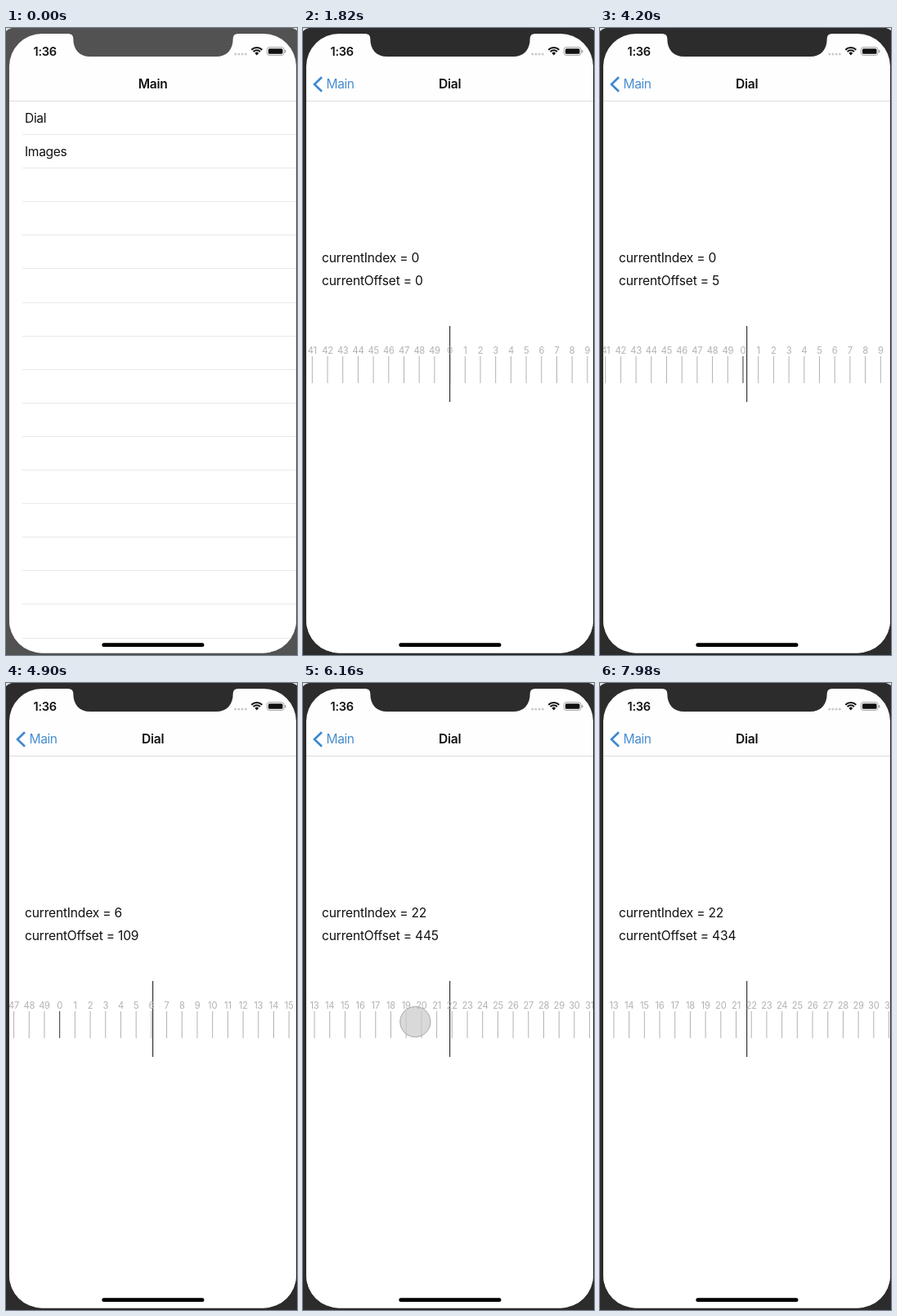
An HTML page with a canvas that plays this animation: 356x768 px, repeating every 8 s.

```html
<!DOCTYPE html>
<html lang="en">
<head>
<meta charset="utf-8">
<title>Dial</title>
<style>
  html, body { margin: 0; width: 100%; height: 100%; overflow: hidden; background: #fff; }
  canvas { display: block; width: 356px; height: 768px; }
</style>
</head>
<body>
<canvas id="stage"></canvas>
<script>
const W = 356, H = 768, LOOP = 8000, STEP = 70;
const LEFT = 4, RIGHT = 355, TOP = 7, BOTTOM = 765.4, MID = 179.6, NAV_BOTTOM = 89.5;
const SCALE = 0.935, TICK = 20, COUNT = 50;
const FONT = 'Inter, Roboto, "Liberation Sans", sans-serif';

const canvas = document.getElementById('stage');
const ratio = window.devicePixelRatio || 1;
canvas.width = W * ratio;
canvas.height = H * ratio;
const ctx = canvas.getContext('2d');

const drag = u => u ** 1.4;
const glide = k => u => (1 - Math.exp(-k * u)) / (1 - Math.exp(-k));

// Offset movements; those with a finger position are drags.
const moves = [
  { start: 2520, end: 2870, from: 0, to: 205, ease: drag, finger: [250, 420, 0] },
  { start: 2870, end: 3430, from: 205, to: 223, ease: glide(8) },
  { start: 3430, end: 3780, from: 223, to: 60, ease: drag, finger: [110, 422, 5] },
  { start: 3780, end: 4480, from: 60, to: 4.5, ease: glide(8) },
  { start: 4480, end: 4760, from: 4.5, to: 90, ease: drag, finger: [260, 415, 0] },
  { start: 4760, end: 5110, from: 90, to: 140, ease: glide(2) },
  { start: 5110, end: 5390, from: 140, to: 312, ease: drag, finger: [270, 415, 0] },
  { start: 5390, end: 6090, from: 312, to: 445, ease: glide(1.4) },
  { start: 6090, end: 6370, from: 445, to: 390, ease: drag, finger: [130, 415, 0] },
  { start: 6370, end: 6580, from: 390, to: 375, ease: glide(2) },
  { start: 6930, end: 7350, from: 375, to: 412, ease: drag, finger: [153, 420.5, 8] },
  { start: 7350, end: 8050, from: 412, to: 434.2, ease: glide(4) }
];

function dialState(t) {
  const move = moves.filter(m => t >= m.start).pop();
  if (!move) return { offset: 0 };
  const u = Math.min(1, (t - move.start) / (move.end - move.start));
  const offset = move.from + (move.to - move.from) * move.ease(u);
  if (!move.finger || u >= 1) return { offset };
  const [x, y, drift] = move.finger;
  return { offset, finger: [x - (offset - move.from) * SCALE, y + drift * u] };
}

function text(str, x, y, { size = 15.6, weight = 400, color = '#111', align = 'left', spacing = -0.33 } = {}) {
  ctx.font = `${weight} ${size}px ${FONT}`;
  ctx.letterSpacing = spacing + 'px';
  ctx.textAlign = align;
  ctx.fillStyle = color;
  ctx.fillText(str, x, y);
}

function rect(x, y, w, h, color) {
  ctx.fillStyle = color;
  ctx.fillRect(x, y, w, h);
}

function pill(x, y, w, h, r, color) {
  ctx.fillStyle = color;
  ctx.beginPath();
  ctx.roundRect(x, y, w, h, r);
  ctx.fill();
}

function line(x1, y1, x2, y2, color, width = 1) {
  ctx.strokeStyle = color;
  ctx.lineWidth = width;
  ctx.beginPath();
  ctx.moveTo(x1, y1);
  ctx.lineTo(x2, y2);
  ctx.stroke();
}

function touch(x, y) {
  ctx.beginPath();
  ctx.arc(x, y, 18.6, 0, 7);
  ctx.fillStyle = 'rgba(205, 205, 205, .75)';
  ctx.fill();
  ctx.strokeStyle = '#a6a6a6';
  ctx.lineWidth = 1;
  ctx.stroke();
}

function drawList(pressed) {
  rect(LEFT, NAV_BOTTOM, W, H, '#fff');
  if (pressed) rect(LEFT, NAV_BOTTOM, W, 41, '#d9d9d9');
  for (let i = 1; i <= 16; i++) {
    const y = Math.floor(89.4 + 41.1 * i) + 0.5;
    line(20, y, W, y, '#e9e9e9');
  }
  text('Dial', 23, 115.6);
  text('Images', 23, 156.7);
}

// The offset label trails the scale by one step.
function drawDial(t) {
  const { offset, finger } = dialState(t);
  const index = Math.round(offset / TICK);
  rect(LEFT, NAV_BOTTOM, W, H, '#fff');
  text(`currentIndex = ${index % COUNT}`, 23, 286.5, { spacing: -0.2 });
  text(`currentOffset = ${Math.round(dialState(t - STEP).offset)}`, 23, 314.6, { spacing: -0.2 });
  line(MID, 365, MID, 458, '#333', 1.2);
  for (let i = index - 10; i <= index + 10; i++) {
    const x = MID + (i * TICK - offset) * SCALE;
    const value = (i + COUNT) % COUNT;
    text(value, x, 399, { size: 11.2, color: '#b2b2b2', align: 'center', spacing: -0.25 });
    line(x, 402, x, 435, value ? '#b2b2b2' : '#333');
  }
  if (finger) touch(...finger);
}

function drawNav(p) {
  rect(LEFT, 45, W, NAV_BOTTOM - 45, '#fefefe');
  line(LEFT, NAV_BOTTOM, W, NAV_BOTTOM, '#dcdcdc');
  const title = { weight: 600, align: 'center' };
  ctx.globalAlpha = 1 - p;
  text('Main', MID - 134 * p, 74.4, title);
  ctx.globalAlpha = p;
  text('Dial', MID + 150 * (1 - p), 74.4, title);
  text('Main', 28.6 + 134 * (1 - p), 74.4, { color: '#478dd0', spacing: -0.45 });
  ctx.strokeStyle = '#3d87d0';
  ctx.lineWidth = 2.6;
  ctx.beginPath();
  ctx.moveTo(23, 60.2);
  ctx.lineTo(14, 69);
  ctx.lineTo(23, 77.8);
  ctx.stroke();
  ctx.globalAlpha = 1;
}

function drawStatus() {
  text('1:36', 33.6, 33.8, { size: 14.6, weight: 600 });
  for (let i = 0; i < 4; i++) pill(279.2 + 4.2 * i, 30.4, 3, 3, 1.5, '#cacaca');
  ctx.strokeStyle = '#111';
  ctx.lineWidth = 2;
  for (const r of [9.2, 5.9]) {
    ctx.beginPath();
    ctx.arc(306.8, 33.2, r, -Math.PI * 0.75, -Math.PI * 0.25);
    ctx.stroke();
  }
  ctx.fillStyle = '#111';
  ctx.beginPath();
  ctx.moveTo(306.8, 33.4);
  ctx.arc(306.8, 33.2, 3.4, -Math.PI * 0.75, -Math.PI * 0.25);
  ctx.fill();
  ctx.strokeStyle = '#a2a2a2';
  ctx.lineWidth = 1;
  ctx.beginPath();
  ctx.roundRect(319.3, 23.6, 20.8, 9.8, 2.8);
  ctx.stroke();
  pill(320.9, 25.2, 17.6, 6.6, 1.5, '#111');
  pill(341, 26.8, 1.4, 3.6, 0.7, '#a2a2a2');
}

const screen = new Path2D();
screen.roundRect(LEFT, TOP, RIGHT - LEFT, BOTTOM - TOP, 40);
const notch = new Path2D('M76 6V7Q82.3 7 82.3 13C82.3 27 90 35 103 35H257C270 35 277.7 27 277.7 13Q277.7 7 284 7V6Z');
const corners = new Path2D('M0 0H7Q3 1 0 4ZM356 0H350Q353 1 356 3Z');

function draw(t) {
  const bezel = t < 980 ? '#525252' : '#2c2c2c';
  const u = Math.min(1, Math.max(0, (t - 1190) / 630));
  const push = 1 - (1 - u) ** 3.5;
  const width = RIGHT - LEFT;

  ctx.setTransform(ratio, 0, 0, ratio, 0, 0);
  rect(0, 0, W, H, bezel);
  ctx.fillStyle = '#e2e2e2';
  ctx.fill(corners);

  ctx.save();
  ctx.clip(screen);
  rect(0, 0, W, H, '#fefefe');
  if (push < 1) {
    ctx.save();
    ctx.translate(-0.3 * width * push, 0);
    drawList(t >= 1120);
    ctx.restore();
    rect(LEFT, NAV_BOTTOM, W, H, `rgba(0, 0, 0, ${0.1 * push})`);
  }
  if (push > 0) {
    ctx.save();
    ctx.translate(width * (1 - push), 0);
    drawDial(t);
    ctx.restore();
  }
  drawNav(push);
  if (t >= 1050 && t < 1260) touch(130, 112);
  drawStatus();
  pill(117.3, 753.3, 125.2, 4.7, 2.35, '#000');
  ctx.restore();

  ctx.fillStyle = bezel;
  ctx.fill(notch);
}

const began = performance.now();
function tick() {
  const t = (performance.now() - began) % LOOP;
  draw(Math.floor(t / STEP) * STEP);
  requestAnimationFrame(tick);
}
tick();
</script>
</body>
</html>
```
